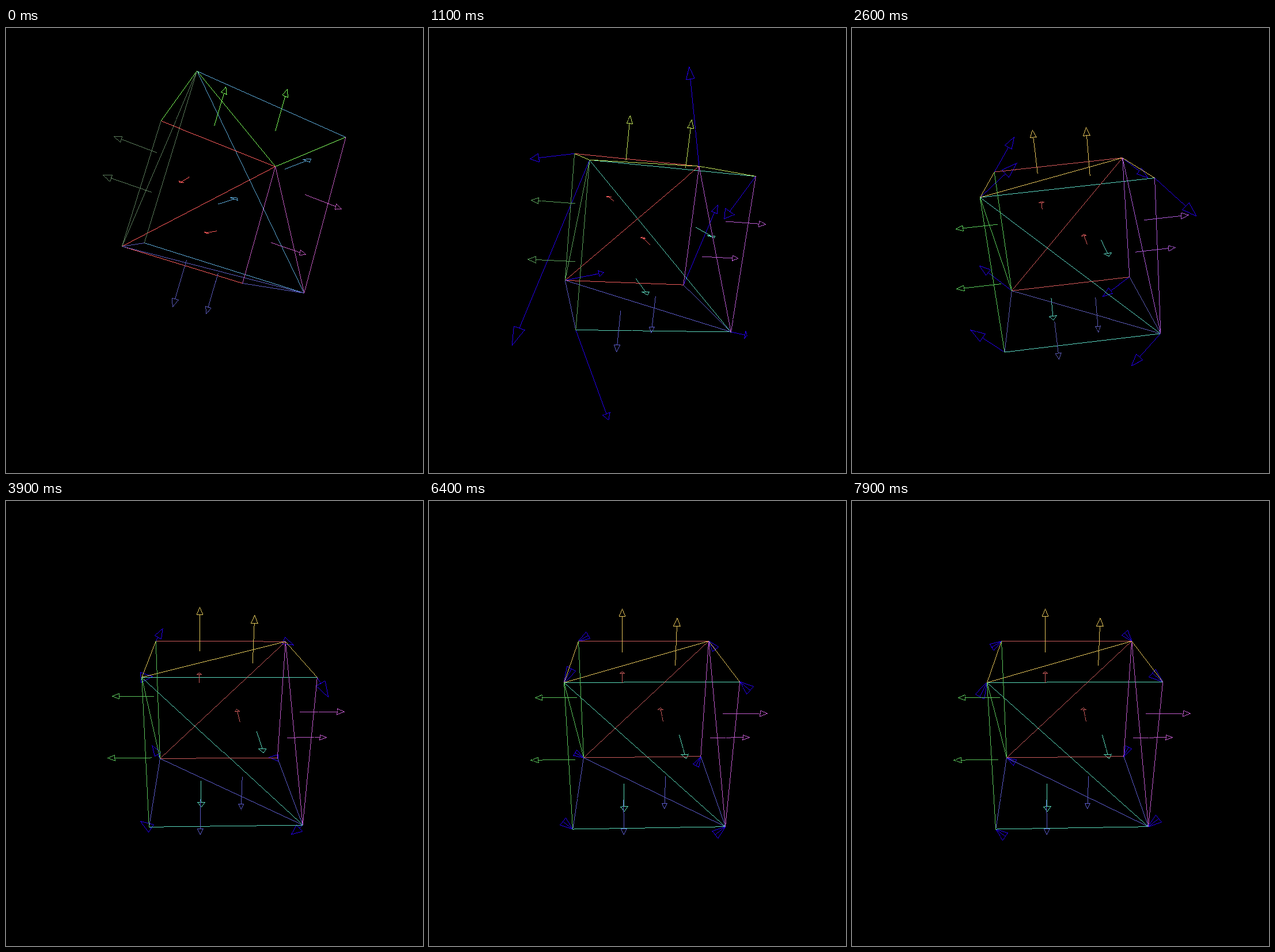
An HTML page with a canvas that plays this animation: 724 px wide and 773 px high, repeating every 8 s.

```html
<!DOCTYPE html>
<html lang="en">
<head>
<meta charset="utf-8">
<title>Tumbling wire cube</title>
<style>
html, body { margin: 0; width: 100%; height: 100%; overflow: hidden; background: #000; }
canvas { display: block; width: 724px; height: 773px; }
</style>
</head>
<body>
<canvas id="stage" width="724" height="773"></canvas>
<script>
// Camera space: x right, y down, z away from the viewer. The cube's edge is 1.
const ctx = document.getElementById('stage').getContext('2d');
const WIDTH = 724, HEIGHT = 773, FOCAL = 800;
const REST = [.062, .024, 3.274], RISE = [0, -1, -.37];
const CAMERA_PITCH = 23.4;
const AMBIENT = 90;
const LIGHTS = [[105, -140, 105], [-110, -105, -125], [110, 110, -100]]; // red, green, blue
const SETTLED = 39; // from this step on the cube only jitters

// The fall: height above rest, angles in degrees, angular velocity, falling speed
const moments = [
  { step: 0,  height: .392, pitch: -.5,  yaw: -18.1, roll: 17.1,  spin: [1.38, .37, -.72], speed: .16 },
  { step: 5,  height: .128, pitch: 12.7, yaw: -14.9, roll: 9.9,   spin: [1.38, .37, -.72], speed: .16 },
  { step: 14, height: .13,  pitch: 16.6, yaw: -4.8,  roll: -20.6, spin: [-.39, -.2, .43], speed: 0 },
  { step: 26, height: .031, pitch: 18.5, yaw: -2.7,  roll: 0,     spin: [.26, -.17, .37], speed: 0 },
  { step: 39, height: 0,    pitch: 23.3, yaw: -2.3,  roll: -.3,   spin: [.003, -.0005, .002], speed: 0 },
  { step: 50, height: 0,    pitch: 23.4, yaw: -2.3,  roll: -.5,   spin: [-.0008, -.0004, .002], speed: 0 },
];

const mix = (a, b, u) => Array.isArray(a) ? a.map((x, i) => mix(x, b[i], u)) : a + (b - a) * u;
const add = (a, b, k = 1) => a.map((x, i) => x + b[i] * k);
const scale = (a, k) => a.map(x => x * k);
const dot = (a, b) => a.reduce((sum, x, i) => sum + x * b[i], 0);
const cross = ([a, b, c], [x, y, z]) => [b * z - c * y, c * x - a * z, a * y - b * x];
const unit = a => scale(a, 1 / (Math.hypot(...a) || 1));
const project = ([x, y, z]) => [WIDTH / 2 + FOCAL * x / z, HEIGHT / 2 + FOCAL * y / z];

// The cube's x, y and z axes after roll, pitch and yaw
function orientation(pitch, yaw, roll) {
  const [p, w, r] = [pitch, yaw, roll].map(deg => deg * Math.PI / 180);
  return [[Math.cos(r), Math.sin(r), 0], [-Math.sin(r), Math.cos(r), 0], [0, 0, 1]]
    .map(([x, y, z]) => [x, y * Math.cos(p) - z * Math.sin(p), y * Math.sin(p) + z * Math.cos(p)])
    .map(([x, y, z]) => [x * Math.cos(w) + z * Math.sin(w), y, z * Math.cos(w) - x * Math.sin(w)]);
}
const WORLD = orientation(CAMERA_PITCH, 0, 0);

function momentAt(step) {
  const next = moments.findIndex(m => m.step > step);
  if (next < 0) return moments[moments.length - 1];
  const a = moments[next - 1], b = moments[next], u = (step - a.step) / (b.step - a.step);
  return Object.fromEntries(Object.keys(a).map(key => [key, mix(a[key], b[key], u)]));
}

// Hard one-pixel line without smoothing
function line(from, to) {
  const a = project(from), b = project(to);
  const n = Math.max(1, Math.round(Math.max(Math.abs(b[0] - a[0]), Math.abs(b[1] - a[1]))));
  for (let i = 0; i <= n; i++) {
    const [x, y] = mix(a, b, i / n);
    ctx.fillRect(Math.round(x), Math.round(y), 1, 1);
  }
}

function arrow(start, tip, dir, side, length, halfWidth) {
  const base = add(tip, dir, -length);
  const left = add(base, side, -halfWidth), right = add(base, side, halfWidth);
  line(start, base);
  line(left, right);
  line(left, tip);
  line(right, tip);
}

// Bits 0, 1 and 2 of a corner's number are its x, y and z sides
const CORNERS = [...Array(8).keys()];
const bit = (corner, axis) => corner >> axis & 1;
const isEven = corner => (bit(corner, 0) + bit(corner, 1) + bit(corner, 2)) % 2 === 0;

function drawVelocities(points, centre, spin, fall) {
  ctx.fillStyle = '#2400f0';
  for (const point of points) {
    const velocity = add(cross(spin, add(point, centre, -1)), fall);
    const tip = add(point, velocity), dir = unit(velocity);
    arrow(point, tip, dir, unit(cross(dir, tip)), .09, .028);
  }
}

// Diagonals join the even corners; each face also owns two of its parallel edges
function drawFace(points, axes, axis, far) {
  const sign = far ? 1 : -1;
  const normal = axes.map(a => sign * dot(a, WORLD[axis]));
  ctx.fillStyle = `rgb(${LIGHTS.map(light => Math.round(AMBIENT + Math.max(0, dot(normal, light))))})`;

  const corners = CORNERS.filter(c => bit(c, axis) === far);
  const even = corners.filter(isEven), odd = corners.filter(c => !isEven(c));
  const dir = scale(axes[axis], sign), side = axes[axis === 0 ? 1 : 0];
  line(points[even[0]], points[even[1]]);
  for (const corner of odd) {
    line(points[corner], points[corner ^ 1 << (axis + 1) % 3]);
    const middle = [...even, corner].reduce((sum, c) => add(sum, points[c], 1 / 3), [0, 0, 0]);
    arrow(middle, add(middle, dir, .3), dir, side, .05, .021);
  }
}

function draw(step) {
  ctx.fillStyle = '#000';
  ctx.fillRect(0, 0, WIDTH, HEIGHT);
  const { height, pitch, yaw, roll, spin, speed } = momentAt(step);
  const axes = orientation(pitch, yaw, roll);
  const centre = add(REST, RISE, height);
  const points = CORNERS.map(c => axes.reduce((p, a, i) => add(p, a, bit(c, i) - .5), centre));

  const flip = step >= SETTLED && step % 2 === 0 ? -1 : 1;
  if (step > 0) drawVelocities(points, centre, scale(spin, flip), scale(RISE, -speed));
  for (const axis of [2, 1, 0]) for (const far of [0, 1]) drawFace(points, axes, axis, far);
}

let shown = -1;
function tick() {
  const t = performance.now() % 8000;
  const step = t < 500 ? 0 : Math.floor((t - 400) / 100);
  if (step !== shown) draw(shown = step);
  requestAnimationFrame(tick);
}
tick();
</script>
</body>
</html>
```
